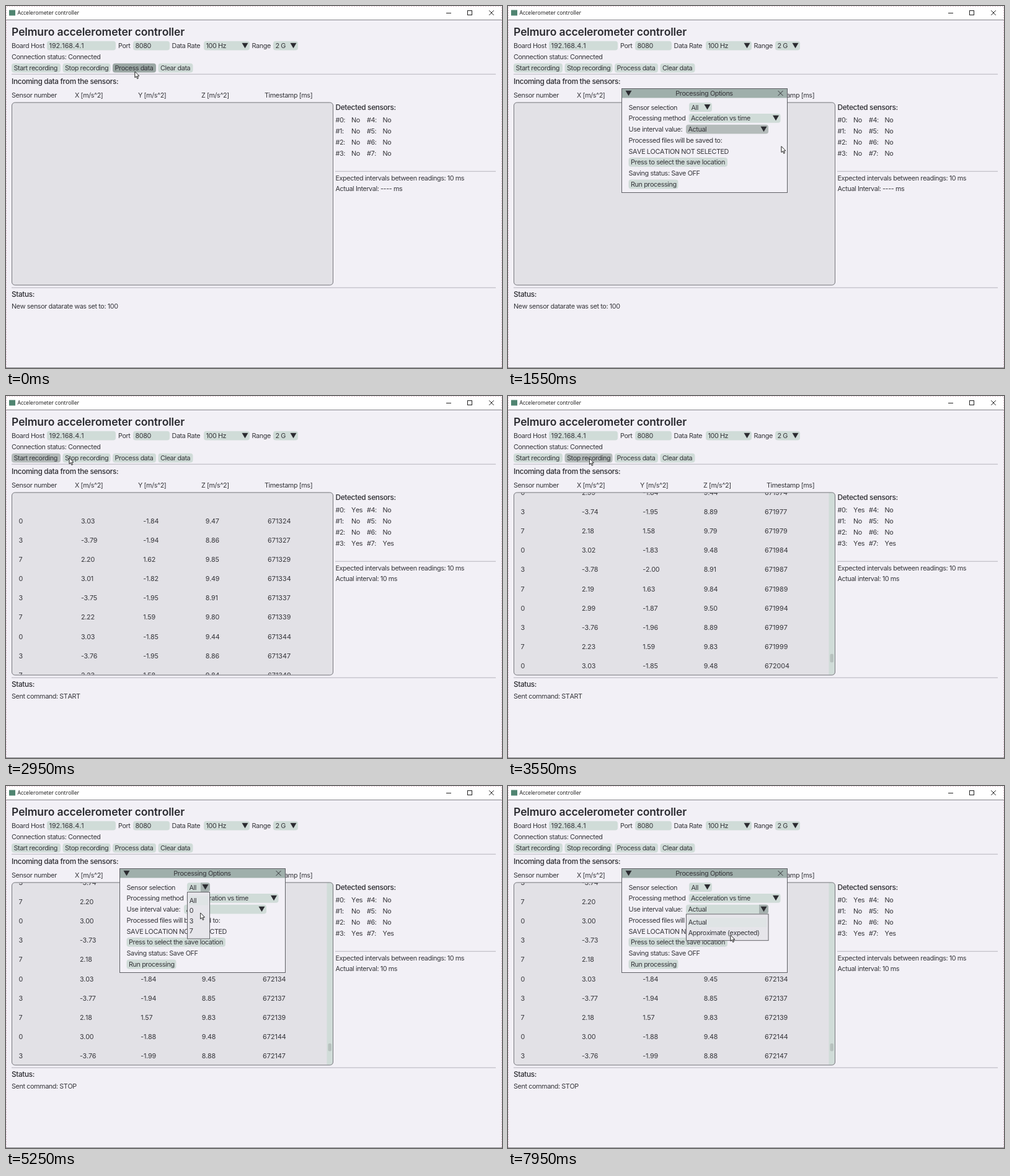
Write an HTML page with a canvas that moves like this. It is 800x585 px and loops after 8 s.

```html
<!DOCTYPE html>
<html lang="en">
<head>
<meta charset="utf-8">
<title>Accelerometer controller</title>
<style>
html, body { margin: 0; width: 100%; height: 100%; overflow: hidden; background: #f2f0f6; }
canvas { display: block; width: 800px; height: 585px; }
</style>
</head>
<body>
<canvas id="stage"></canvas>
<script>
const canvas = document.getElementById('stage');
const ctx = canvas.getContext('2d');
const dpr = window.devicePixelRatio || 1;
canvas.width = 800 * dpr;
canvas.height = 585 * dpr;

const LOOP = 8000, PITCH = 31.1, ROW_MS = 3.06, LAST = 248, BTN_H = 14.8;
const BG = '#f2f0f6', INK = '#35353a', FRAME = '#d0dcd8', HOVER = '#b4bbba', PRESS = '#9ba7a4';
const UI = 'Inter, "Open Sans", sans-serif';

const SENSORS = [
  { id: 0, mean: [3.02, -1.85, 9.47] },
  { id: 3, mean: [-3.76, -1.97, 8.88] },
  { id: 7, mean: [2.2, 1.6, 9.82] }
];

// Stops of the pointer: time, x, y
const STOPS = [
  [100, 208, 106], [400, 250, 150], [850, 331, 163], [1150, 443, 185], [1400, 436, 212],
  [1500, 412, 200], [1550, 441, 227], [2000, 441, 150], [2270, 439, 139],
  [2860, 52, 100], [2950, 102, 100], [3150, 130, 101], [3700, 132, 101],
  [3950, 199, 104], [4100, 199, 104], [4850, 300, 164], [5100, 316, 164],
  [5350, 312, 232], [5700, 430, 181], [6150, 350, 219], [6300, 408, 226],
  [6550, 400, 250], [6900, 430, 172], [7100, 430, 172], [7350, 413, 200],
  [7700, 335, 225], [7950, 359, 241]
];

const between = (t, a, b) => t >= a && t < b;

function pointer(t) {
  const next = STOPS.findIndex(p => p[0] > t);
  if (next === 0) return STOPS[0].slice(1);
  if (next < 0) return STOPS.at(-1).slice(1);
  const [t0, x0, y0] = STOPS[next - 1], [t1, x1, y1] = STOPS[next];
  const k = (t - t0) / (t1 - t0);
  return [x0 + (x1 - x0) * k, y0 + (y1 - y0) * k];
}

function noise(n) {
  const v = Math.sin(n * 127.1 + 11.7) * 43758.5453;
  return v - Math.floor(v) - 0.5;
}

const reading = i => SENSORS[i % 3].mean.map((m, k) => (m + noise(i * 3 + k) * 0.07).toFixed(2));
const stamp = i => 671324 + 10 * Math.floor(i / 3) + Math.round(2.6 * (i % 3));

// y is the middle of the capitals
function text(s, x, y, o = {}) {
  const size = o.size || 10.8;
  ctx.font = `${o.weight || 400} ${size}px ${o.font || UI}`;
  ctx.fontKerning = 'none';
  ctx.letterSpacing = (o.gap ?? -0.4) + 'px';
  ctx.textAlign = o.align || 'left';
  ctx.fillStyle = o.color || INK;
  ctx.fillText(s, x, y + size * 0.364);
}

const title = (s, x, y) => text(s, x, y, { size: 11.8, weight: 500, gap: -0.33, color: '#2c2c31' });

function rect(x, y, w, h, color) {
  ctx.fillStyle = color;
  ctx.fillRect(x, y, w, h);
}

function round(x, y, w, h, color, r = 4) {
  ctx.beginPath();
  ctx.roundRect(x, y, w, h, r);
  ctx.fillStyle = color;
  ctx.fill();
}

function stroke(color, width, ...points) {
  ctx.beginPath();
  points.forEach(([x, y]) => ctx.lineTo(x, y));
  ctx.strokeStyle = color;
  ctx.lineWidth = width;
  ctx.stroke();
}

function cross(x, y, r, color) {
  stroke(color, 1, [x - r, y - r], [x + r, y + r]);
  stroke(color, 1, [x + r, y - r], [x - r, y + r]);
}

function arrow(x, y) {
  ctx.beginPath();
  ctx.moveTo(x - 5, y - 4);
  ctx.lineTo(x + 5, y - 4);
  ctx.lineTo(x, y + 4.5);
  ctx.fillStyle = '#2b2b30';
  ctx.fill();
}

const rule = (x, y) => rect(x, y, 790 - x, 1, '#b6b4bc');

function over(s, x, y, w) {
  return !s.menu && between(s.hx, x, x + w) && between(s.hy, y, y + BTN_H);
}

function button(s, label, x, y, w, pressed) {
  round(x, y, w, BTN_H, pressed ? PRESS : over(s, x, y, w) ? HOVER : FRAME);
  text(label, x + 3.5, y + 7.4);
}

function combo(s, label, x, y, w, open) {
  round(x, y, w, BTN_H, over(s, x, y, w) ? HOVER : FRAME);
  if (open) round(x + w - 15, y, 15, BTN_H, '#a5b0ae', [0, 4, 4, 0]);
  text(label, x + 3.5, y + 7.4);
  arrow(x + w - 7.5, y + 6.9);
}

function field(label, x, w, gap) {
  round(x, 56.8, w, BTN_H, FRAME);
  text(label, x + 3.5, 64.2, { gap });
}

function dropdown(x, y, w, items) {
  const step = 16.35, h = 27.3 + (items.length - 1) * step;
  rect(x, y, w, h, '#e6e5ea');
  rect(x + 3, y + 6.5, w - 6, 15, '#dfe4e5');
  ctx.strokeStyle = '#66666b';
  ctx.lineWidth = 1;
  ctx.strokeRect(x + 0.5, y + 0.5, w - 1, h - 1);
  items.forEach((item, i) => text(item, x + 3.7, y + 14 + i * step));
}

function windowBar() {
  rect(0, 0, 800, 22, '#ffffff');
  rect(0, 22, 800, 1, '#85858a');
  rect(5, 6.5, 10, 9, '#4f8470');
  text('Accelerometer controller', 18.5, 11, {
    size: 8.6, gap: 0, font: '"Open Sans", "Noto Sans", sans-serif', color: '#111'
  });
  stroke('#222', 1, [710, 11.5], [718, 11.5]);
  ctx.strokeRect(744.5, 7.5, 7, 7);
  cross(783, 11, 3.8, '#222');
}

function header(s) {
  text('Pelmuro accelerometer controller', 9, 42, { size: 17.5, weight: 600, gap: -0.15, color: '#2a2a2f' });
  text('Board Host', 9, 64.2);
  field('192.168.4.1', 66, 111, 0);
  text('Port', 181, 64.2);
  field('8080', 205, 59);
  text('Data Rate', 267.5, 64.2);
  combo(s, '100 Hz', 319, 56.8, 74);
  text('Range', 396.5, 64.2);
  combo(s, '2 G', 431, 56.8, 40);
  text('Connection status: Connected', 9, 82.3);
  const t = s.t;
  button(s, 'Start recording', 9, 92.7, 79, between(t, 2840, 2890));
  button(s, 'Stop recording', 91.5, 92.7, 77, between(t, 3640, 3700));
  button(s, 'Process data', 172, 92.7, 70, t < 100 || between(t, 4030, 4075));
  button(s, 'Clear data', 245.5, 92.7, 56);
  rule(9, 109.7);
}

function rowsOf(n) {
  const scrolled = n > 9, first = scrolled ? n - 10 : 0;
  const top = scrolled ? 436 - 9 * PITCH : 202;
  const left = 20.5, col = scrolled ? 98.4 : 100.4;
  for (let i = first; i < n; i++) {
    const y = top + (i - first) * PITCH;
    text(SENSORS[i % 3].id, left, y);
    reading(i).forEach((v, k) => text(v, left + col * (k + 1), y, { gap: -0.25 }));
    text(stamp(i), left + col * 4, y, { gap: 0 });
  }
  if (!scrolled) return;
  rect(517.5, 156, 9.5, 295, FRAME);
  const h = Math.max(12.5, 295 * 295 / (n * PITCH));
  round(519.5, 440 - n / 21.5 - h, 5.5, h, '#b7c1be', 2);
}

function table(s) {
  title('Incoming data from the sensors:', 9, 121.3);
  ['Sensor number', 'X [m/s^2]', 'Y [m/s^2]', 'Z [m/s^2]', 'Timestamp [ms]']
    .forEach((h, i) => text(h, 9 + i * 102, 144.5));

  round(9, 155.5, 519, 296, '#e2e1e6', 5);
  ctx.save();
  ctx.beginPath();
  ctx.roundRect(10, 156.5, 517, 294, 4);
  ctx.clip();
  rowsOf(s.rows);
  ctx.restore();
  ctx.beginPath();
  ctx.roundRect(9.5, 156, 518, 295, 5);
  ctx.strokeStyle = '#77777d';
  ctx.lineWidth = 1;
  ctx.stroke();
}

function side(s) {
  const live = s.rows > 0;
  title('Detected sensors:', 531.5, 164);
  for (let i = 0; i < 8; i++) {
    const x = i < 4 ? 531.5 : 582, y = 184.5 + (i % 4) * 17.8;
    const found = live && SENSORS.some(d => d.id === i);
    text(`#${i}:`, x, y);
    text(found ? 'Yes' : 'No', x + 25.5, y);
  }
  rule(531, 266.7);
  text('Expected intervals between readings: 10 ms', 531.5, 277.8);
  text(live ? 'Actual interval: 10 ms' : 'Actual Interval: ---- ms', 531.5, 295.5);
}

function footer(t) {
  rule(9, 454.7);
  title('Status:', 9, 466);
  text(t < 2900 ? 'New sensor datarate was set to: 100'
    : 'Sent command: ' + (t < 3700 ? 'START' : 'STOP'), 9, 485);
}

function options(s) {
  rect(183, 133, 268, 169, '#606066');
  rect(184, 134, 266, 167, BG);
  rect(184, 134, 266, 14.5, '#9fafab');
  arrow(194.5, 140.8);
  text('Processing Options', 316.5, 141, { align: 'center' });
  cross(439.5, 141, 4, '#333338');

  const x = 194.5, line = i => 163.6 + i * 17.77;
  ['Sensor selection', 'Processing method', 'Use interval value:', 'Processed files will be saved to:',
    'SAVE LOCATION NOT SELECTED', '', 'Saving status: Save OFF'].forEach((s, i) => text(s, x, line(i)));
  combo(s, 'All', 292, line(0) - 7.4, 37, s.menu === 1);
  combo(s, 'Acceleration vs time', 291.5, line(1) - 7.4, 148, s.menu === 2);
  combo(s, 'Actual', 287, line(2) - 7.4, 133, s.menu === 3);
  button(s, 'Press to select the save location', x, line(5) - 7.4, 159.5);
  button(s, 'Run processing', x, line(7) - 7.4, 80);

  if (s.menu === 1) dropdown(292, 171, 37, ['All', ...SENSORS.map(d => d.id)]);
  if (s.menu === 2) dropdown(291, 189, 149,
    ['Acceleration vs time', 'Magnitude of acceleration', 'Fast Fourier transform', 'CSV export']);
  if (s.menu === 3) dropdown(287, 206.5, 133.5, ['Actual', 'Approximate (expected)']);
}

function cursor(x, y) {
  ctx.save();
  ctx.translate(x, y);
  ctx.fillStyle = '#fff';
  ctx.lineJoin = 'round';
  const shape = [[0, 0], [0, 9.6], [2.2, 7.6], [3.8, 11.4], [5.3, 10.7], [3.7, 7.1], [6.8, 7], [0, 0]];
  stroke('#222', 0.8, ...shape);
  ctx.fill();
  ctx.stroke();
  ctx.restore();
}

function edges() {
  ctx.save();
  ctx.setLineDash([2, 2]);
  stroke('rgba(205,150,175,.6)', 1, [0.5, 584], [0.5, 0.5], [799.5, 0.5], [799.5, 584]);
  ctx.restore();
  rect(0, 584, 800, 1, '#8d8d92');
}

function stateAt(t) {
  const tick = Math.floor(t / 50) * 50;
  const menu = between(t, 5025, 5525) ? 1 : between(t, 5775, 7150) ? 2 : t >= 7425 ? 3 : 0;
  const [hx, hy] = pointer(t - 50); // highlights trail the pointer
  const rows = tick < 2950 ? 0 : Math.min(LAST, 9 + Math.round((tick - 2950) / ROW_MS));
  return { t, menu, hx, hy, rows, open: between(t, 125, 2275) || t >= 4075 };
}

function draw(t) {
  const s = stateAt(t);
  ctx.setTransform(dpr, 0, 0, dpr, 0, 0);
  rect(0, 0, 800, 585, BG);
  windowBar();
  header(s);
  table(s);
  side(s);
  footer(t);
  if (s.open) options(s);
  edges();
  cursor(...pointer(t));
}

const began = performance.now();
function loop() {
  draw((performance.now() - began) % LOOP);
  requestAnimationFrame(loop);
}
loop();
</script>
</body>
</html>
```
